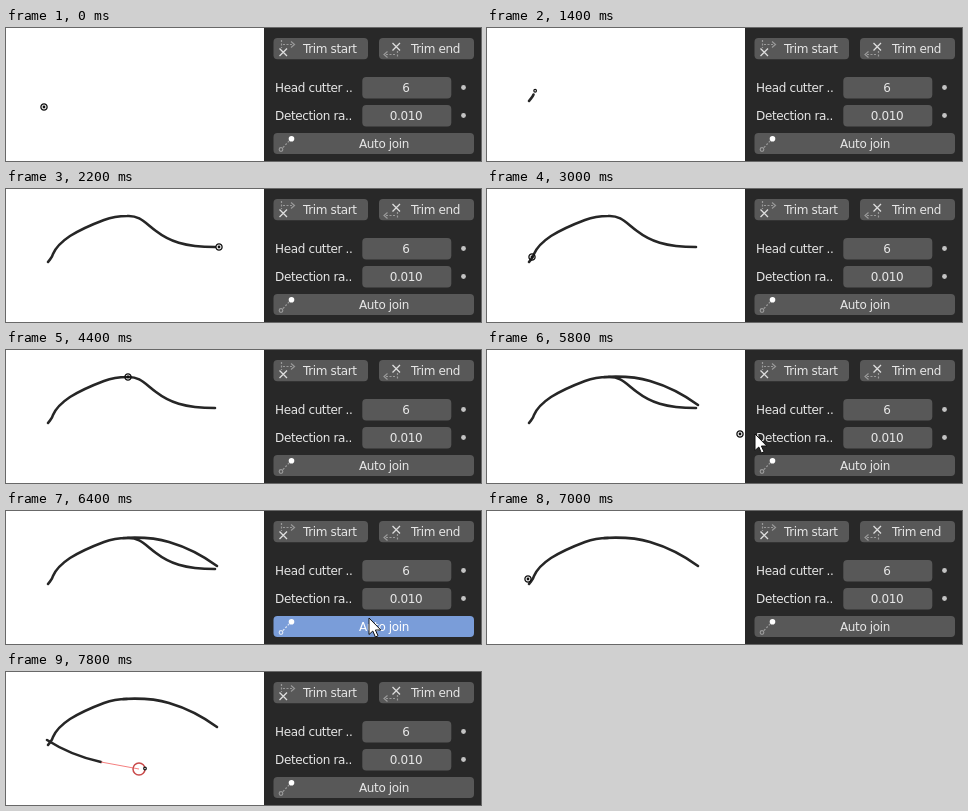
An HTML page that plays this animation: 475 px wide and 133 px high, repeating every 8000 ms.

```html
<!DOCTYPE html>
<html lang="en">
<head>
<meta charset="utf-8">
<title>Stroke joining</title>
<style>
html, body { margin: 0; width: 100%; height: 100%; overflow: hidden; background: #fff; }
svg { display: block; }
text { font: 12px "DejaVu Sans", sans-serif; letter-spacing: -.36px; fill: #e6e6e6; }
.mid { text-anchor: middle; }
.box { fill: #585858; }
.ink { fill: none; stroke: #262626; stroke-width: 2.6; stroke-linecap: round; stroke-linejoin: round; }
.faint { fill: none; stroke: #999; stroke-width: 1.2; }
.dash { stroke-dasharray: 2 1.5; }
.cross { fill: none; stroke: #ddd; stroke-width: 1.3; }
#join.hot .box { fill: #7a9dd9; }
#join.hot text { fill: #fff; }
#join.hot .faint { stroke: #dde6f5; }
</style>
</head>
<body>
<svg width="475" height="133" viewBox="0 0 475 133">
  <g id="strokes"></g>
  <g id="lazy" fill="none">
    <path id="leash" stroke="#f58080"/>
    <circle id="halo" r="6" stroke="#c94a4a" stroke-width="1.5"/>
  </g>
  <g id="ring">
    <circle r="3.1" fill="none" stroke="#111" stroke-width="1.3"/>
    <circle r="1.4" fill="#111"/>
  </g>
  <circle id="tip" r="1.3" fill="#fff" stroke="#111" stroke-width="1.2"/>

  <rect x="258" width="217" height="133" fill="#282828"/>
  <g class="box">
    <rect x="267.5" y="10" width="94.5" height="21.3" rx="4"/>
    <rect x="373" y="10" width="95" height="21.3" rx="4"/>
    <rect x="356.3" y="49" width="89" height="21.5" rx="4"/>
    <rect x="356.3" y="77" width="89" height="21.5" rx="4"/>
  </g>
  <text x="297" y="25">Trim start</text>
  <text x="405" y="25">Trim end</text>
  <text x="269" y="64">Head cutter ..</text>
  <text x="269" y="92">Detection ra..</text>
  <text class="mid" x="400" y="64">6</text>
  <text class="mid" x="400" y="92">0.010</text>
  <g fill="#c4c4c4">
    <circle cx="457.5" cy="59.5" r="2.4"/>
    <circle cx="457.5" cy="87.5" r="2.4"/>
  </g>

  <path class="faint dash" d="M275.5 12V20M277 16.5H286"/>
  <path class="faint" d="M285 13.5L288.5 16.5L285 19.5"/>
  <path class="cross" d="M273.5 20.5L281 28M281 20.5L273.5 28"/>
  <path class="faint dash" d="M380 26.5H390M391.5 23V30"/>
  <path class="faint" d="M381.5 23.5L378 26.5L381.5 29.5"/>
  <path class="cross" d="M386.5 15L394 22.5M394 15L386.5 22.5"/>

  <g id="join">
    <rect class="box" x="267.5" y="105" width="200.5" height="21" rx="4"/>
    <circle class="faint" cx="275" cy="121.5" r="1.8"/>
    <path class="faint dash" d="M277 119.5L283.5 112.5"/>
    <circle cx="285.5" cy="110.8" r="2.8" fill="#fff"/>
    <text class="mid" x="378" y="120">Auto join</text>
  </g>
  <path id="arrow" d="M0 0V16.5L3.8 13L6.4 19L9 17.8L6.4 12H11.8Z" fill="#fff" stroke="#111"/>
</svg>
<script>
const LOOP = 8000, STEP = 200;
const HEAD = "M42 73C44 70 46 69 47 65C50 58 58 51 64 47C77 39 90 34 98 31C106 28 114 27 121 27";
const TAIL = "C134 26 140 35 150 42C163 52 178 58 209 58";
const $ = id => document.getElementById(id);

function makePath(d) {
  const path = document.createElementNS("http://www.w3.org/2000/svg", "path");
  path.setAttribute("d", d);
  return path;
}

// Each leg moves the brush along a path; an ink leg leaves its path behind
function leg(start, end, d, ink = false) {
  const path = makePath(d);
  if (ink) {
    path.setAttribute("class", "ink");
    $("strokes").append(path);
  }
  return { start, end, path, ink, size: path.getTotalLength() };
}

const first = leg(1200, 2200, HEAD + TAIL, true);
const second = leg(4600, 5400, "M117 27C135 26 150 27 163 31C180 36 196 44 211 55", true);
const third = leg(7000, 7800, "M41 68C55 77 72 85 95 90", true);
const legs = [
  leg(0, 600, "M38 79L36 89"),
  leg(800, 1200, "M36 89L42 73"),
  first,
  leg(2200, 2400, "M213 58L246 60"),
  leg(2400, 2800, "M246 60L26 83"),
  leg(2800, 3000, "M26 83L45 68"),
  leg(3000, 4000, "M45 68C55 48 80 37 98 31Q118 25 134 28"),
  leg(4000, 4400, "M134 28L122 27"),
  second,
  leg(5400, 5660, "M211 55L242 84H253"),
  leg(6800, 7000, "M132 65L41 68"),
  third
];
const reach = leg(5800, 6200, "M268 84L363 107");

const ease = u => (u * u * (3 - 2 * u)) ** 1.4;

function progress({ start, end, ink }, t) {
  const u = Math.min(1, Math.max(0, (t - start) / (end - start)));
  return ink ? ease(u) : u;
}

const pointOn = (part, t, lead = 0) =>
  part.path.getPointAtLength(part.size * progress(part, t) + lead);

const show = (id, on) => $(id).style.display = on ? "" : "none";
const place = (id, { x, y }) => $(id).setAttribute("transform", `translate(${x} ${y})`);

function reveal(part, t) {
  const done = progress(part, t);
  part.path.style.display = done ? "" : "none";
  part.path.setAttribute("stroke-dasharray", done < 1 ? `${part.size * done} 999` : "none");
}

function draw(t) {
  const now = legs.findLast(part => part.start <= t);
  const drawing = now.ink && t > now.start, lazy = drawing && now === third;

  first.path.setAttribute("d", t >= 6600 ? HEAD : HEAD + TAIL);
  [first, second, third].forEach(part => reveal(part, t));

  show("tip", drawing);
  show("ring", !drawing && (t <= 5800 || t >= 6800));
  show("lazy", lazy);
  place("ring", pointOn(now, t));
  place("tip", pointOn(now, t, 4));
  if (lazy) {
    const end = pointOn(third, t), x = end.x + 38, y = end.y + 7;
    place("halo", { x, y });
    place("tip", { x: x + 6, y: y - .5 });
    $("leash").setAttribute("d", `M${end.x} ${end.y}L${x} ${y}`);
  }

  show("arrow", t >= 5800 && t < 6800);
  place("arrow", pointOn(reach, t));
  $("join").classList.toggle("hot", t >= 6200 && t < 6800);
}

function tick() {
  const t = performance.now() % LOOP;
  draw(Math.floor(t / STEP) * STEP);
  requestAnimationFrame(tick);
}
tick();
</script>
</body>
</html>
```
